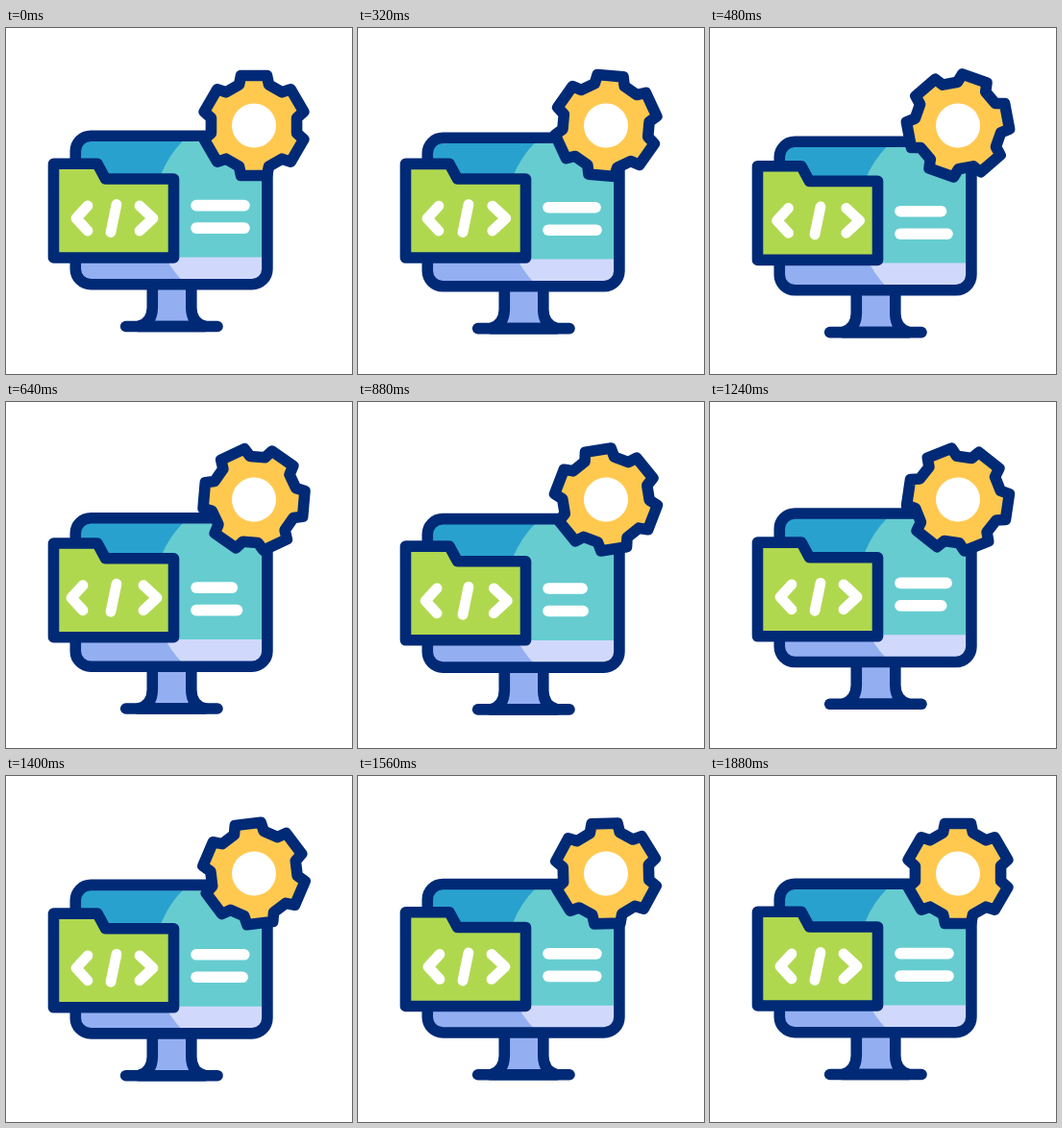
These frames come from a looping animation (360x360 px, 2000 ms). An HTML page:

```html
<!DOCTYPE html>
<html>
<head>
<meta charset="utf-8">
<style>
html, body { margin: 0; height: 100%; overflow: hidden; background: #fff; }
svg { display: block; width: 100vw; height: 100vh; }
.ink { stroke: #002a76; }
.mark { stroke: #fff; fill: none; }
</style>
</head>
<body>
<svg viewBox="0 0 360 360" stroke-width="11.6" stroke-linecap="round" stroke-linejoin="round">
  <clipPath id="screen"><rect x="72.3" y="112.2" width="199.6" height="154.5" rx="16"/></clipPath>
  <g id="monitor">
    <path class="ink" fill="#93aff2" d="M152.3 268V291Q152 307 138 310.5H207Q193 307 192.8 291V268"/>
    <path class="ink" d="M124.7 310.5H220"/>
    <g clip-path="url(#screen)">
      <path fill="#29a1ce" d="M72 112H272V239H72z"/>
      <path fill="#93aff2" d="M72 238.5H272V268H72z"/>
      <clipPath id="shine"><circle cx="258" cy="190.5" r="104"/></clipPath>
      <g clip-path="url(#shine)">
        <path fill="#66ccd0" d="M140 100H280V239H140z"/>
        <path fill="#d0d9fc" d="M140 238.5H280V280H140z"/>
      </g>
    </g>
    <rect class="ink" fill="none" x="72.3" y="112.2" width="199.6" height="154.5" rx="16"/>
    <path id="line1" class="mark"/>
    <path id="line2" class="mark"/>
  </g>
  <g id="folder">
    <path class="ink" fill="#b0d84f" d="M49.5 141.3H95L103.5 157H174.5V239H49.5z"/>
    <g class="mark" stroke-width="10.8">
      <path id="left" d="M85 185L73 198L85 211"/>
      <path d="M115 183.5L109 212.5"/>
      <path id="right" d="M139 185L153 198L139 211"/>
    </g>
  </g>
  <g id="gear">
    <path id="teeth" class="ink" fill="#ffc950"/>
    <circle r="23" fill="#fff"/>
  </g>
</svg>
<script>
const el = id => document.getElementById(id);
const move = (id, x, y) => el(id).setAttribute('transform', `translate(${x} ${y})`);

// Six tapered teeth, 60 degrees apart
const tooth = [[-15.5, -42.5], [-13.5, -52], [13.5, -52], [15.5, -42.5]];
const outline = [];
for (let i = 0; i < 6; i++) {
  const c = Math.cos(i * Math.PI / 3), s = Math.sin(i * Math.PI / 3);
  for (const [x, y] of tooth) outline.push([x * c - y * s, x * s + y * c]);
}
el('teeth').setAttribute('d', 'M' + outline.join('L') + 'z');

// Soft start at a, long settling tail with time scale b
const ease = (t, a, b) => t <= a ? 0 : 1 - Math.exp(-(((t - a) / b) ** 1.8));
const swing = (t, a, b, c, d) => ease(t, a, b) - ease(t, c, d);

function draw(t) {
  move('monitor', 0, 9.5 * swing(t, 185, 290, 960, 294));
  move('folder', 0, 9.8 * swing(t, 300, 365, 985, 310));

  const spread = 5.8 * swing(t, 200, 300, 720, 200);
  move('left', -spread, 0);
  move('right', spread * 0.8, 0);

  const end1 = 248 - 15 * swing(t, 260, 270, 880, 240);
  const end2 = 248 - 15 * swing(t, 420, 270, 1040, 240);
  el('line1').setAttribute('d', `M198 184.6H${end1}`);
  el('line2').setAttribute('d', `M198 208.1H${end2}`);

  const turn = 60 * (ease(t, 195, 481) + ease(t, 915, 313));
  el('gear').setAttribute('transform', `translate(258 101.5) rotate(${turn})`);
}

const start = performance.now();
function tick() {
  const t = Math.floor((performance.now() - start) % 2000 / 40) * 40;
  draw(t < 80 ? 0 : Math.min(t, 1880));
  requestAnimationFrame(tick);
}
tick();
</script>
</body>
</html>
```
